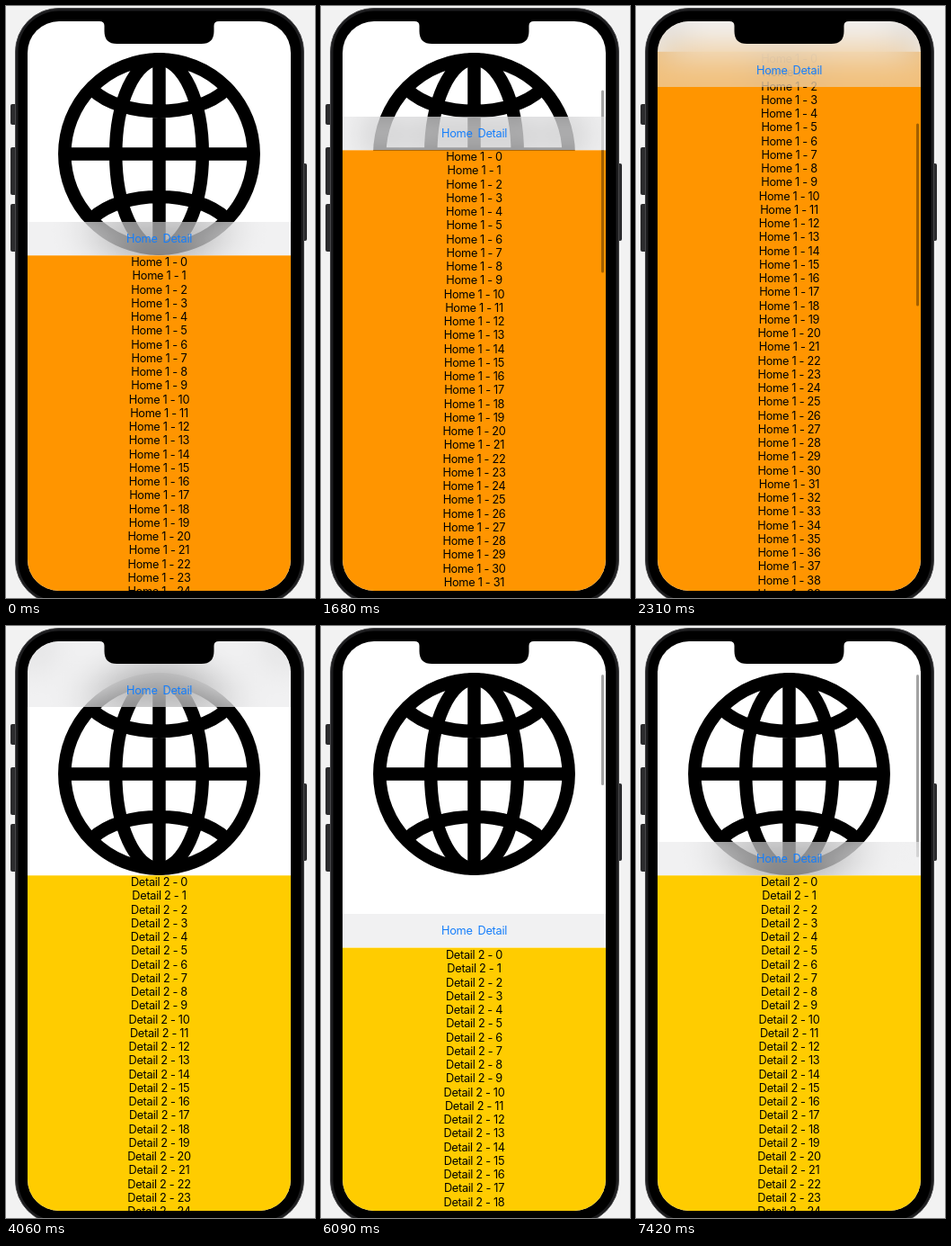
These frames come from a looping animation (344 px wide and 658 px high, 8 s). An HTML page:

```html
<!DOCTYPE html>
<html lang="en">
<head>
<meta charset="utf-8">
<title>Sticky tab bar</title>
<style>
  html, body { margin: 0; width: 100%; height: 100%; overflow: hidden; background: #f2f2f2; }
  body { position: relative; font: 400 12.77px/15.25px Inter, "Liberation Sans", sans-serif; letter-spacing: -.3px; color: #000; }
  body * { position: absolute; box-sizing: border-box; }
  .button { background: #2b2b2d; border-radius: 2px; }
  .phone { left: 10px; top: 2px; width: 321.5px; height: 663px; border-radius: 49px; background: #000;
    border: 1.5px solid #48484a; box-shadow: inset 0 0 0 2.5px #1d1d1f; }
  .screen { left: 24px; top: 17px; width: 293px; height: 633px; border-radius: 35px; overflow: hidden; background: #fff; }
  svg { left: 0; top: 0; }
  .page { inset: 0; }
  .list { left: 0; top: 0; width: 100%; text-align: center; white-space: pre; }
  .list div { position: static; height: 15.25px; }
  .home { background: #ff9500; }
  .detail { background: #fc0; }
  .thumb { left: 288.4px; top: 0; width: 2.4px; border-radius: 2px; background: rgba(0,0,0,.36); }
  .bar { left: 0; width: 100%; background: rgba(229,229,230,.53); backdrop-filter: blur(22px); }
  .tabs { left: 0; right: 0; bottom: 11px; display: flex; justify-content: center; gap: 6px; color: #157efb; }
  .tabs span { position: static; }
</style>
</head>
<body>
<div class="button" style="left:5px;top:109px;width:7px;height:23px"></div>
<div class="button" style="left:5px;top:157px;width:7px;height:53px"></div>
<div class="button" style="left:5px;top:220px;width:7px;height:53px"></div>
<div class="button" style="left:329px;top:175px;width:6px;height:86px"></div>
<div class="phone"></div>
<div class="screen">
  <svg width="293" height="633" viewBox="24 17 293 633" fill="none" stroke="#000" stroke-width="14.5">
    <circle cx="170.5" cy="164.5" r="105.2"/>
    <ellipse cx="170.5" cy="164.5" rx="48.3" ry="105.2"/>
    <path d="M170.5 56V273M62 164.5H279M96 93C130 125 211 125 245 93M96 236C130 204 211 204 245 236"/>
  </svg>
  <div class="page" id="home"><div class="list home"></div><div class="thumb"></div></div>
  <div class="page" id="detail"><div class="list detail"></div><div class="thumb"></div></div>
  <div class="bar"><div class="tabs"><span>Home</span><span>Detail</span></div></div>
</div>
<svg width="344" height="658" viewBox="0 0 344 658">
  <path d="M104 16V17Q109.500 17 109.500 22V28Q109.500 42 123.500 42H217.500Q231.500 42 231.500 28V22Q231.500 17 237 17V16Z"/>
</svg>
<script>
const LOOP = 8000, STEP = 70;
const REST = 260.3, SAFE = 35.3, BAR = 37.5, WIDTH = 293;
const SWIPE = [3500, 4060], PULL = 5670;

// [time, distance scrolled]; negative values pull past the top
const homeScroll = [[0, 0], [980, 0], [1050, 83], [1120, 100], [1190, 111], [1610, 111],
  [1680, 117], [1820, 141], [2030, 187], [2170, 212], [2240, 221], [2310, 226.5]];
const detailScroll = [[0, 0], [5600, 0], [5740, -20], [5950, -61], [6090, -80.3], [6230, -90],
  [6440, -96], [6580, -97], [6720, -97], [6790, -72], [6860, -39], [6930, -18.7],
  [7000, -10], [7070, -5], [7140, -2.7], [7280, -0.7], [7350, -0.7], [7420, 0]];

const $ = selector => document.querySelector(selector);
const bar = $('.bar');

function makePage(id, label) {
  const page = $('#' + id), list = page.querySelector('.list');
  for (let i = 0; i < 100; i++) {
    const row = document.createElement('div');
    row.textContent = `${label} - ${i}`;
    list.append(row);
  }
  return { page, list, thumb: page.querySelector('.thumb') };
}

function sample(keys, t) {
  const next = keys.findIndex(key => key[0] > t);
  if (next < 0) return keys[keys.length - 1][1];
  const [t0, a] = keys[next - 1], [t1, b] = keys[next];
  return a + (b - a) * (t - t0) / (t1 - t0);
}

function place({ page, list, thumb }, x, scroll, showThumb) {
  page.style.transform = `translateX(${x}px)`;
  list.style.transform = `translateY(${REST - scroll}px)`;
  thumb.style.opacity = showThumb ? 1 : 0;
  thumb.style.height = 203 + Math.min(0, scroll) + 'px';
  thumb.style.transform = `translateY(${37 + Math.max(0, scroll) * .338}px)`;
}

const home = makePage('home', 'Home 1'), detail = makePage('detail', 'Detail 2');

function draw(time) {
  const t = Math.floor((time % LOOP) / STEP + 1e-6) * STEP;
  const k = Math.min(1, Math.max(0, (t - SWIPE[0]) / (SWIPE[1] - SWIPE[0])));
  const slide = WIDTH * (1 - Math.cos(Math.PI * k)) / 2;
  const up = sample(homeScroll, t), down = sample(detailScroll, t);
  place(home, -slide, up, t >= 1050);
  place(detail, WIDTH - slide, down, t >= PULL);

  const top = REST - BAR - (t < PULL ? up : down);
  const pinned = top <= SAFE;
  bar.style.top = (pinned ? 0 : top) + 'px';
  bar.style.height = (pinned ? SAFE + BAR : BAR) + 'px';
}

const start = performance.now();
function tick() {
  draw(performance.now() - start);
  requestAnimationFrame(tick);
}
tick();
</script>
</body>
</html>
```
